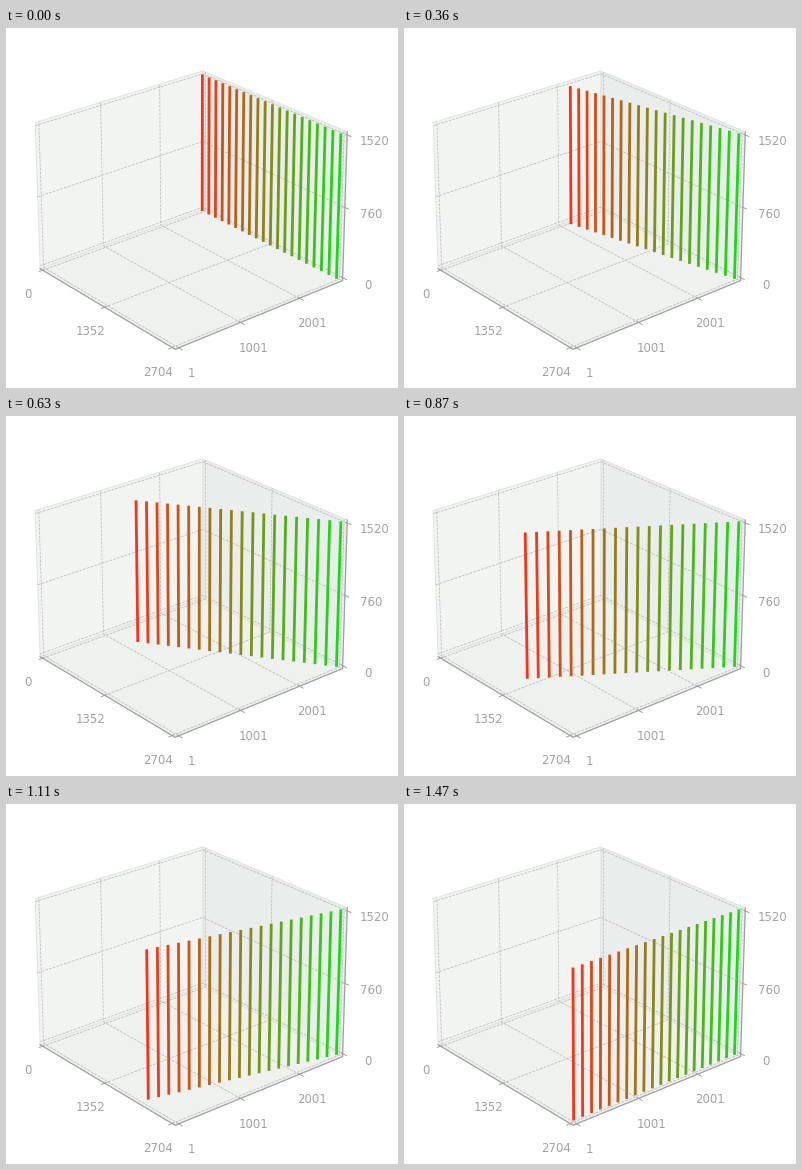
Animation, 392 px wide and 360 px high, one loop 1500 ms. Source, as a matplotlib script:

```python
import numpy as np
import matplotlib.pyplot as plt
from matplotlib.animation import FuncAnimation
from matplotlib.collections import LineCollection
from matplotlib.patches import Polygon

WIDTH, HEIGHT, DPI = 392, 360, 100
PX = 72 / DPI              # one pixel in points
FRAMES, INTERVAL = 50, 30
RODS = 20
LO, HI = -1 / 48, 1 + 1 / 48   # panes sit slightly outside the data cube

# Cube points (x, y, z) and where they fall on the stage.
ANCHORS = [
    ((LO, LO, LO), (34.3, 241)), ((HI, LO, LO), (169.6, 321.5)),
    ((HI, HI, LO), (336.7, 252)), ((LO, HI, LO), (197.4, 181.3)),
    ((LO, LO, HI), (29.2, 95)), ((LO, HI, HI), (197.8, 43.5)),
    ((HI, HI, HI), (341.5, 104.5)),
    ((0, 1, 0), (195.5, 182)), ((0, 1, 1), (195.3, 47)),
    ((1, 0, 0), (169.1, 315)), ((1, 0, 1), (169, 164)),
    ((1, 1, 0), (330.3, 250)), ((1, 1, 1), (334.8, 107)),
]


def fit_camera(anchors):
    """Least-squares 3x4 perspective matrix."""
    rows, values = [], []
    for point, (sx, sy) in anchors:
        p = np.array([*point, 1.0])
        zero = np.zeros(4)
        rows.append(np.r_[p, zero, -sx * p[:3]])
        rows.append(np.r_[zero, p, -sy * p[:3]])
        values += [sx, sy]
    h = np.linalg.lstsq(np.array(rows), np.array(values), rcond=None)[0]
    return np.r_[h, 1].reshape(3, 4)


CAMERA = fit_camera(ANCHORS)


def project(x, y, z):
    a, b, w = CAMERA @ np.array([x, y, z, 1.0])
    return a / w, b / w


fig = plt.figure(figsize=(WIDTH / DPI, HEIGHT / DPI), dpi=DPI, facecolor="white")
ax = fig.add_axes([0, 0, 1, 1])
ax.set_xlim(0, WIDTH)
ax.set_ylim(HEIGHT, 0)
ax.axis("off")


def pane(corners, color):
    ax.add_patch(Polygon([project(*c) for c in corners], closed=True, fc=color,
                         ec="#e0e3e1", lw=PX, zorder=1))


def line(points, color, width, zorder, **style):
    xs, ys = zip(*(project(*p) for p in points))
    ax.plot(xs, ys, color=color, lw=width * PX, zorder=zorder, **style)


def grid(*points):
    line(points, "#b8b8b8", 0.75, 2, dashes=(3.7, 1.6))


def tick(start, end):
    line([start, end], "#a0a0a0", 1, 4)


# Panes
pane([(LO, LO, LO), (LO, HI, LO), (LO, HI, HI), (LO, LO, HI)], "#f2f4f2")
pane([(LO, HI, LO), (HI, HI, LO), (HI, HI, HI), (LO, HI, HI)], "#e9edeb")
pane([(LO, LO, LO), (HI, LO, LO), (HI, HI, LO), (LO, HI, LO)], "#eff1ef")

# Grid lines and ticks
for x in (0, 0.5, 1):
    grid((x, LO, LO), (x, HI, LO), (x, HI, HI))
    tick((x, LO + 0.008, LO), (x, LO - 0.02, LO))
for y in (0, 1000 / 2703, 2000 / 2703):
    grid((HI, y, LO), (LO, y, LO), (LO, y, HI))
    tick((HI - 0.008, y, LO), (HI + 0.025, y, LO))
for z in (0, 0.5, 1):
    grid((LO, LO, z), (LO, HI, z), (HI, HI, z))
    tick((HI - 0.008, HI, z), (HI + 0.025, HI, z))

# Axis lines
line([(LO, LO, LO), (HI, LO, LO), (HI, HI, LO), (HI, HI, HI)], "#a0a0a0", 1.2, 3)

LABELS = [
    ("0", 22.3, 264.5), ("1352", 84.4, 301.7), ("2704", 151.7, 343.5),
    ("1", 185.6, 344.4), ("1001", 247.5, 319.2), ("2001", 305.8, 294.2),
    ("0", 362, 256.2), ("760", 365.5, 184.8), ("1520", 369, 112.2),
]
for text, x, y in LABELS:
    ax.text(x, y, text, color="#a2a2a2", fontsize=11.7 * PX, family="DejaVu Sans",
            ha="center", va="center_baseline", zorder=4)

# Rods fade from red to green towards the hinge
red, green = np.array([0.97, 0.2, 0.1]), np.array([0.1, 0.86, 0.08])
mix = np.linspace(0, 1, RODS)
rods = LineCollection([], colors=[red + (green - red) * k for k in mix],
                      linewidths=2.8 * PX, capstyle="projecting", zorder=5)
ax.add_collection(rods)


def draw(frame):
    """Swing the row a quarter turn about its hinge at (1, 1)."""
    eased = (1 - np.cos(np.pi * frame / (FRAMES - 0.5))) / 2
    angle = eased * np.pi / 2
    segments = []
    for reach in 1 - mix:
        x, y = 1 - reach * np.cos(angle), 1 - reach * np.sin(angle)
        segments.append([project(x, y, 0), project(x, y, 1)])
    rods.set_segments(segments)
    return (rods,)


anim = FuncAnimation(fig, draw, frames=FRAMES, interval=INTERVAL,
                     repeat=True, repeat_delay=0, blit=False)
plt.show()
```
